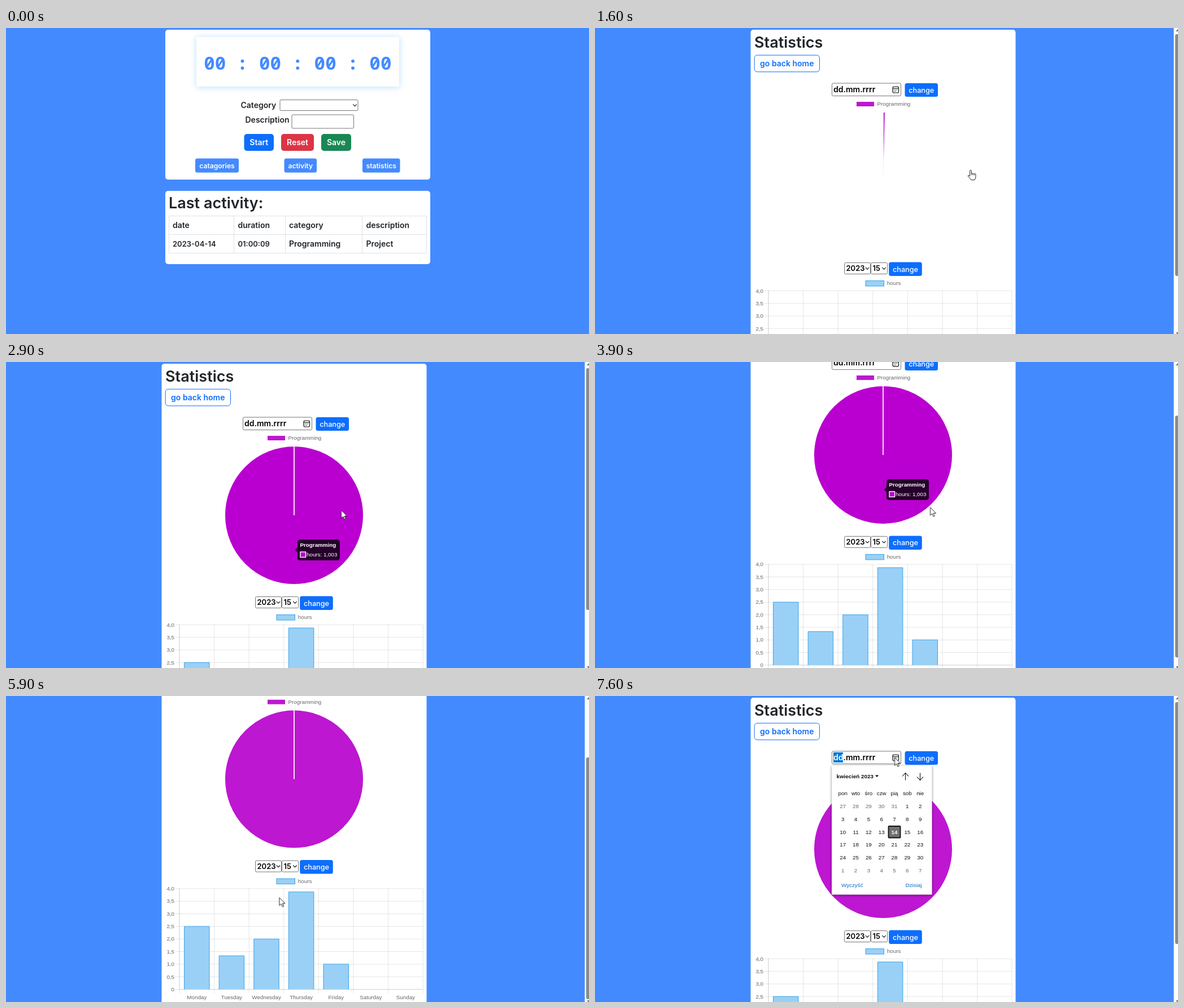
Write an HTML page that moves like this. It is 1032x543 px and loops after 8 s.

```html
<!DOCTYPE html>
<html lang="en">
<head>
<meta charset="utf-8">
<title>Time tracker</title>
<style>
@property --y { syntax: '<number>'; inherits: true; initial-value: 0; }
html, body { margin: 0; height: 100%; overflow: hidden; background: #448aff; }
svg { display: block; width: 1032px; height: 543px; }
text { font: 600 14px Inter, sans-serif; fill: #212529; }
.h1 { font-size: 27px; }
.mid { text-anchor: middle; }
.end { text-anchor: end; }
.white { fill: #fff; }
.small { font-size: 12.2px; }
.btn { font-size: 12.7px; font-weight: 500; }
.num { font-size: 13px; }
.black { fill: #000; }
.clock { font: 700 32.6px "Noto Sans Mono", monospace; fill: #448aff; white-space: pre; }
.ui { font: 9.8px "Liberation Sans", Arial, sans-serif; fill: #666; }
.ui.white { fill: #fff; }
.ui.black { fill: #111; }
.ui.link { fill: #0f6cc4; }
.bold { font-weight: 700; }
.field { fill: #fff; stroke: #767676; }
.line { fill: none; stroke: #dee2e6; }
.grid { fill: none; stroke: #000; stroke-opacity: .1; }
.ink { fill: none; stroke: #111; stroke-width: 1.1; }
.glow { filter: drop-shadow(0 1px 6px rgba(0, 140, 255, .28)); }
.drop { filter: drop-shadow(0 1px 2px rgba(0, 0, 0, .5)); }

#home, #stats, .pie, .bar, .tip, #picker, #cursor, #arrow, #hand { animation: 8s linear infinite; }
#home { animation-name: leave; animation-timing-function: step-end; }
#stats { animation-name: arrive, scroll; animation-timing-function: step-end, linear; }
#page { transform: translateY(calc(var(--y) * -1px)); }
#thumb { transform: translateY(calc(var(--y) * .787px)); }
.pie { fill: none; stroke: #bd17d1; stroke-width: 122; stroke-dasharray: 1 2; animation-name: sweep, pieHover; }
.bar { fill: #9ad0f5; stroke: #36a2eb; vector-effect: non-scaling-stroke; transform-origin: 0 645px; animation-name: grow; }
.bar.hot { animation-name: grow, barHover; }
#tipPie { animation-name: tipPie; }
#tipBar { animation-name: tipBar; }
#picker { animation-name: pick; animation-timing-function: step-end; }
#cursor { animation-name: move, seen; animation-timing-function: linear, step-end; }
#arrow { animation-name: arrow; animation-timing-function: step-end; }
#hand { animation-name: hand; animation-timing-function: step-end; }

@keyframes leave { 0% { opacity: 1 } 18.75%, 100% { opacity: 0 } }
@keyframes arrive { 0% { opacity: 0 } 18.75%, 100% { opacity: 1 } }
@keyframes scroll {
  0%, 43.75% { --y: 0 } 45% { --y: 8 } 46.25% { --y: 42 } 47.5% { --y: 84 } 48.75% { --y: 107 }
  50% { --y: 119 } 51.25%, 78.75% { --y: 124.4 } 80% { --y: 82 } 81.25% { --y: 5 } 82.5%, 100% { --y: 0 }
}
@keyframes sweep {
  0%, 20% { stroke-dashoffset: 1; animation-timing-function: cubic-bezier(.25, 1, .5, 1) }
  32.5%, 100% { stroke-dashoffset: 0 }
}
@keyframes grow {
  0%, 20% { transform: scaleY(0); animation-timing-function: cubic-bezier(.25, 1, .5, 1) }
  32.5%, 100% { transform: none }
}
@keyframes pieHover {
  0%, 30% { stroke: #bd17d1 } 33%, 58.5% { stroke: #ba00d0 } 60%, 82.5% { stroke: #bd17d1 }
  84%, 88.5% { stroke: #ba00d0 } 90%, 100% { stroke: #bd17d1 }
}
@keyframes barHover {
  0%, 60.5% { fill: #9ad0f5 } 62%, 71% { fill: #82cbff } 72.5%, 100% { fill: #9ad0f5 }
}
@keyframes tipPie {
  0%, 32.5% { opacity: 0 } 36.25%, 58.5% { opacity: 1 } 60%, 83% { opacity: 0 }
  85%, 88.5% { opacity: 1 } 90%, 100% { opacity: 0 }
}
@keyframes tipBar { 0%, 60.5% { opacity: 0 } 63%, 71% { opacity: 1 } 72.5%, 100% { opacity: 0 } }
@keyframes pick { 0% { opacity: 0 } 93.75%, 100% { opacity: 1 } }
@keyframes seen { 0% { opacity: 0 } 2.5%, 100% { opacity: 1 } }
@keyframes arrow { 0% { opacity: 1 } 12% { opacity: 0 } 24.5%, 100% { opacity: 1 } }
@keyframes hand { 0% { opacity: 0 } 12% { opacity: 1 } 24.5%, 100% { opacity: 0 } }
@keyframes move {
  0%, 2.5% { transform: translate(988px, 85px) }
  5% { transform: translate(925px, 140px) }
  7.5% { transform: translate(830px, 212px) }
  10% { transform: translate(745px, 248px) }
  12.5% { transform: translate(681px, 253px) }
  15%, 24.375% { transform: translate(665px, 252px) }
  27.5% { transform: translate(640px, 262px) }
  35%, 38% { transform: translate(593.5px, 263px) }
  41.25%, 57.5% { transform: translate(593.5px, 258px) }
  62% { transform: translate(525px, 424px) }
  63.75%, 67.5% { transform: translate(520.5px, 429.5px) }
  72% { transform: translate(494px, 376px) }
  77.5%, 81.25% { transform: translate(462.5px, 319px) }
  91.25%, 100% { transform: translate(530.5px, 109px) }
}
</style>
</head>
<body>
<svg id="stage" viewBox="0 0 1032 543"></svg>
<script>
const text = (x, y, s, cls = '') => `<text x="${x}" y="${y}" class="${cls}">${s}</text>`;
const rect = (x, y, w, h, r, fill, more = '') =>
  `<rect x="${x}" y="${y}" width="${w}" height="${h}" rx="${r}" fill="${fill}" ${more}/>`;
const path = (d, cls, more = '') => `<path d="${d}" class="${cls}" ${more}/>`;
const field = (x, y, w, h) => rect(x, y, w, h, 2, '', 'class="field"');
const chevron = (x, y) => path(`M${x - 3.2} ${y - 1.6}l3.2 3.2 3.2-3.2`, 'ink', 'stroke-width="1.6"');
const button = (x, y, w, h, fill, label, cls = '') =>
  rect(x, y, w, h, cls ? 3.5 : 5, fill) + text(x + w / 2, y + h / 2 + 4.8, label, 'mid white ' + cls);
const range = n => [...Array(n).keys()];

const blue = '#448aff', primary = '#0d6efd', purple = '#bd17d1';

function home() {
  const cols = [295, 410.5, 501, 637.5];
  const row = (y, cells) => cells.map((s, i) => text(cols[i], y, s)).join('');
  return rect(282, 3, 469, 266, 5, '#fff') +
    rect(337, 16, 359, 88, 3, '#fff', 'class="glow"') +
    text(516.3, 73.5, '00 : 00 : 00 : 00', 'clock mid') +
    text(415.5, 141.5, 'Category') + field(485, 127.5, 138, 19) + chevron(617.5, 137) +
    text(423.5, 168, 'Description') + field(506, 154, 109.5, 24) +
    button(421.5, 188, 52.5, 30, primary, 'Start') +
    button(487, 188, 58, 30, '#dc3545', 'Reset') +
    button(558, 188, 53, 30, '#198754', 'Save') +
    button(335, 231.5, 77, 25, blue, 'catagories', 'small') +
    button(492.5, 231.5, 57.5, 25, blue, 'activity', 'small') +
    button(631, 231.5, 66.5, 25, blue, 'statistics', 'small') +
    rect(282, 289, 469, 130, 5, '#fff') + text(288, 320, 'Last activity:', 'h1') +
    path('M288.5 333.5H744.5V399.5H288.5ZM288.5 366.5H744.5M403.5 333.5V399.5M494.5 333.5V399.5M630.5 333.5V399.5', 'line') +
    row(354.5, ['date', 'duration', 'category', 'description']) +
    row(387.5, ['', '', 'Programming', 'Project']) +
    text(295, 387.5, '2023-04-14', 'num') + text(410.5, 387.5, '01:00:09', 'num');
}

function tip(id, x, y, title, value, fill) {
  return `<g id="${id}" class="tip">` +
    path(`M${x + 4.5} ${y}h66a4.5 4.5 0 0 1 4.5 4.5v28a4.5 4.5 0 0 1-4.5 4.5h-66a4.5 4.5 0 0 1-4.5-4.5v-9.5l-4.5-4.5 4.5-4.5v-9.5a4.5 4.5 0 0 1 4.5-4.5z`, '', 'fill-opacity=".8"') +
    text(x + 4.5, y + 13, title, 'ui white bold') +
    rect(x + 5, y + 22, 9.5, 9.5, 0, fill, 'stroke="#fff" stroke-width="1.4"') +
    text(x + 16, y + 30, 'hours: ' + value, 'ui white') + '</g>';
}

function barChart() {
  const left = 307, base = 645, step = 61.6, unit = 44.7;
  const days = ['Monday', 'Tuesday', 'Wednesday', 'Thursday', 'Friday', 'Saturday', 'Sunday'];
  const hours = [2.5, 1.335, 2, 3.871, 1.003];
  let out = '';
  for (const i of range(9)) {
    const y = base - i * unit / 2;
    out += path(`M${left - 7} ${y}H738`, 'grid') +
      text(298, y + 3.3, i ? (i / 2).toFixed(1).replace('.', ',') : '0', 'ui end');
  }
  for (const i of range(8)) out += path(`M${left + i * step} 466V${base + 7}`, 'grid');
  out += path(`M${left} 466V${base}H738`, 'grid');
  days.forEach((d, i) => {
    const mid = left + (i + .5) * step;
    out += text(mid, 662.8, d, 'ui mid');
    if (hours[i]) out += path(`M${mid - 22.2} ${base}V${base - hours[i] * unit}h44.4V${base}`, i == 3 ? 'bar hot' : 'bar');
  });
  return out;
}

function picker() {
  const col = i => 438.7 + i * 22.83, row = i => 199 + i * 22.83;
  let out = rect(422, 100, 17, 18, 0, '#0078d7') + text(422, 113.5, 'dd', 'white') +
    rect(419, 123.5, 177.5, 229, 1, '#fff', 'class="drop"') +
    text(427.5, 145.5, 'kwiecień 2023', 'ui black bold') + path('M496 140.5h6l-3 3.5z', '') +
    path('M549.5 149.5V136.5M544 142.5l5.5-6 5.5 6M575.5 136.5V149.5M570 143.5l5.5 6 5.5-6', 'ink') +
    rect(519.5, 231, 21, 20.5, 1, '#707070', 'stroke="#111" stroke-width="1.8"');
  ['pon', 'wto', 'śro', 'czw', 'pią', 'sob', 'nie'].forEach((d, i) => out += text(col(i), 176, d, 'ui mid black'));
  for (const i of range(42)) {
    const n = i - 4, day = n < 1 ? n + 31 : n > 30 ? n - 30 : n;
    const tone = n == 14 ? 'white bold' : n == day ? 'black' : '';
    out += text(col(i % 7), row(i / 7 | 0), day, 'ui mid ' + tone);
  }
  return `<g id="picker">${out}${text(436, 338.5, 'Wyczyść', 'ui link')}${text(578.5, 338.5, 'Dzisiaj', 'ui link end')}</g>`;
}

function stats() {
  return '<g id="page">' + rect(275.5, 3, 469, 720, 5, '#fff') +
    text(282, 34.5, 'Statistics', 'h1') +
    rect(282.2, 48.2, 115.3, 29.6, 5, '#fff', `stroke="${primary}"`) +
    `<text x="339.8" y="67.5" class="mid" style="fill:${primary}">go back home</text>` +
    field(419.5, 98, 122, 22.5) + text(422, 113.5, 'dd.mm.rrrr', 'black') +
    rect(527, 104, 10.5, 11, 2.5, 'none', 'stroke="#111" stroke-width="1.2"') +
    path('M527 107.2H537.5', 'ink') +
    path('M529.3 109.8h6M529.3 112.3h4', 'ink', 'stroke-dasharray="1.3 1"') +
    button(548.5, 98, 58.5, 24, primary, 'change', 'btn') +
    rect(463, 131, 31, 8, 0, purple) + text(499.5, 138, 'Programming', 'ui') +
    '<circle class="pie" cx="510" cy="272" r="61" pathLength="1" transform="rotate(-90 510 272)"/>' +
    path('M510 149V272', '', 'stroke="#fff" stroke-width="1.7"') +
    field(441.5, 416.5, 46, 20) + text(444.5, 431.3, '2023', 'num black') + chevron(482, 426.5) +
    field(488.5, 416.5, 29, 20) + text(491.5, 431.3, '15', 'num black') + chevron(511.5, 426.5) +
    button(520.2, 415.5, 58.6, 24.5, primary, 'change', 'btn') +
    rect(479, 448.5, 32.5, 9.5, 0, '#9ad0f5', 'stroke="#36a2eb"') + text(516.8, 456.3, 'hours', 'ui') +
    barChart() +
    tip('tipPie', 516, 315, 'Programming', '1,003', '#ba00d0') +
    tip('tipBar', 528.5, 453.6, 'Thursday', '3,871', '#9ad0f5') +
    picker() + '</g>' +
    rect(1024.5, 0, 8, 543, 0, '#fcfcfc') +
    rect(1027, 11, 7, 429, 3, '#8b8b8b', 'id="thumb"') +
    path('M1028 6l3.5-4 3.5 4zM1028 540l3.5 4 3.5-4z', '', 'fill="#777"');
}

const cursor = '<g id="cursor" fill="#fff" stroke="#111" stroke-width=".9" stroke-linejoin="round">' +
  path('M0 0V14.2L3.3 11.2 5.5 16.4 7.7 15.4 5.5 10.4H10Z', '', 'id="arrow"') +
  '<g id="hand">' +
  path('M-1.4 11V1.6a1.4 1.4 0 0 1 2.8 0V6.5a1.4 1.4 0 0 1 2.6.4 1.4 1.4 0 0 1 2.6.5 1.2 1.2 0 0 1 2.3.8V12q0 3-1.8 5.6H.6Q-1.6 14-4.6 11q-.3-2 1.6-1.4z', '') +
  path('M1.4 6.5V9M4 7V9.2M6.6 7.6V9.4', '') + '</g></g>';

document.getElementById('stage').innerHTML =
  rect(0, 0, 1032, 543, 0, blue) + `<g id="home">${home()}</g><g id="stats">${stats()}</g>` + cursor;
</script>
</body>
</html>
```
